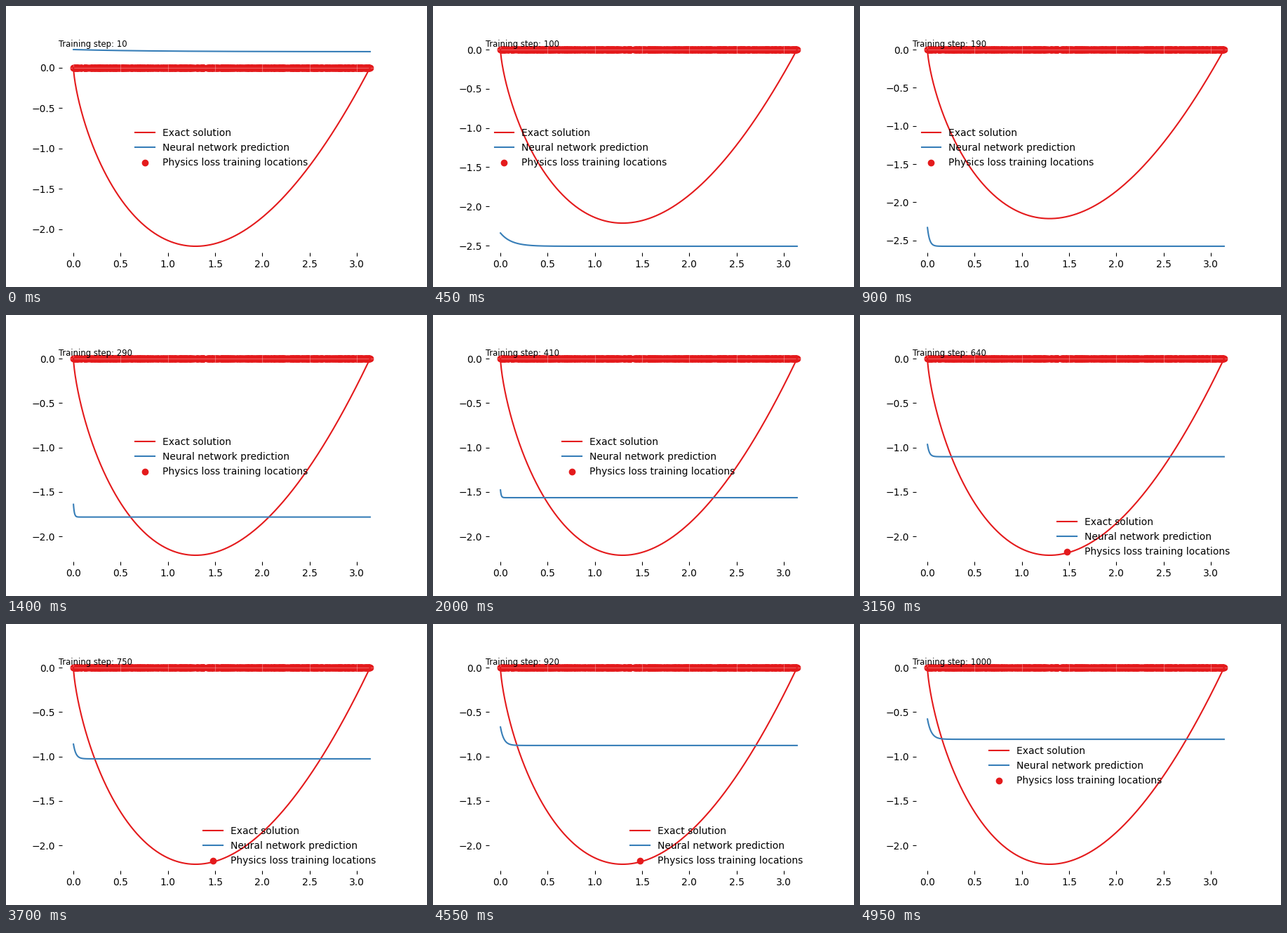
Animation, 600 px wide and 400 px high, one loop 5 s. Source, as a matplotlib script:

```python
import numpy as np
import matplotlib.pyplot as plt
from matplotlib.animation import FuncAnimation

FRAMES, INTERVAL = 100, 50
RED, BLUE = "#e41a1c", "#377eb8"

# Level of the prediction: fast drop, overshoot, slow recovery
KEY_TIMES = np.array([0, 12, 18, 22, 40, 52, 74, 99])
KEY_LEVELS = np.array([0.198, -2.93, -2.575, -2.145,
                       -1.565, -1.244, -1.027, -0.807])
KEY_SLOPES = np.gradient(KEY_LEVELS, KEY_TIMES)


def level(i):
    """Cubic Hermite curve through the key levels."""
    j = np.clip(np.searchsorted(KEY_TIMES, i) - 1, 0, len(KEY_TIMES) - 2)
    h = KEY_TIMES[j + 1] - KEY_TIMES[j]
    s = (i - KEY_TIMES[j]) / h
    ease = s * s * (3 - 2 * s)
    return ((1 - ease) * KEY_LEVELS[j] + ease * KEY_LEVELS[j + 1]
            + h * s * (1 - s) * ((1 - s) * KEY_SLOPES[j]
                                 - s * KEY_SLOPES[j + 1]))


def prediction(i):
    """Flat line with an exponential rise towards x = 0."""
    height = 0.0025 * i - 0.02 + 0.225 * np.exp(-((i - 16) / 9) ** 2 / 2)
    width = 0.8 * np.exp(-i / 4.5) + max(0.008, 0.00056 * (i - 27))
    return level(i) + height * np.exp(-x / width)


# Single-precision end point, as used in network training
end = float(np.float32(np.pi))
x = np.linspace(0, end, 1000)
exact = x ** 1.7 - np.pi * x ** 0.7
rng = np.random.default_rng(4)
points = np.append(rng.uniform(0, end, 1000), [0, end])

fig, ax = plt.subplots(figsize=(6, 4), dpi=100)
ax.plot(x, exact, color=RED, lw=1.5, label="Exact solution")
line, = ax.plot(x, prediction(0), color=BLUE, lw=1.5,
                label="Neural network prediction")
ax.scatter(points, np.zeros_like(points), color=RED,
           label="Physics loss training locations")
label = ax.text(0, 1, "", transform=ax.transAxes, va="top", fontsize="small")

ax.set_xlim(-0.05 * end, 1.05 * end)
ax.grid(color="white", lw=0.8, alpha=0.3)
ax.tick_params(direction="in")
for spine in ax.spines.values():
    spine.set_visible(False)
ax.legend(loc="best", frameon=False)


def update(i):
    y = prediction(i)
    line.set_ydata(y)
    low, high = min(exact.min(), y.min()), max(exact.max(), y.max())
    pad = 0.05 * (high - low)
    ax.set_ylim(low - pad, high + pad)
    label.set_text(f"Training step: {10 * (i + 1)}")
    return line, label


anim = FuncAnimation(fig, update, frames=FRAMES, interval=INTERVAL,
                     repeat=True, repeat_delay=0)
plt.show()
```
